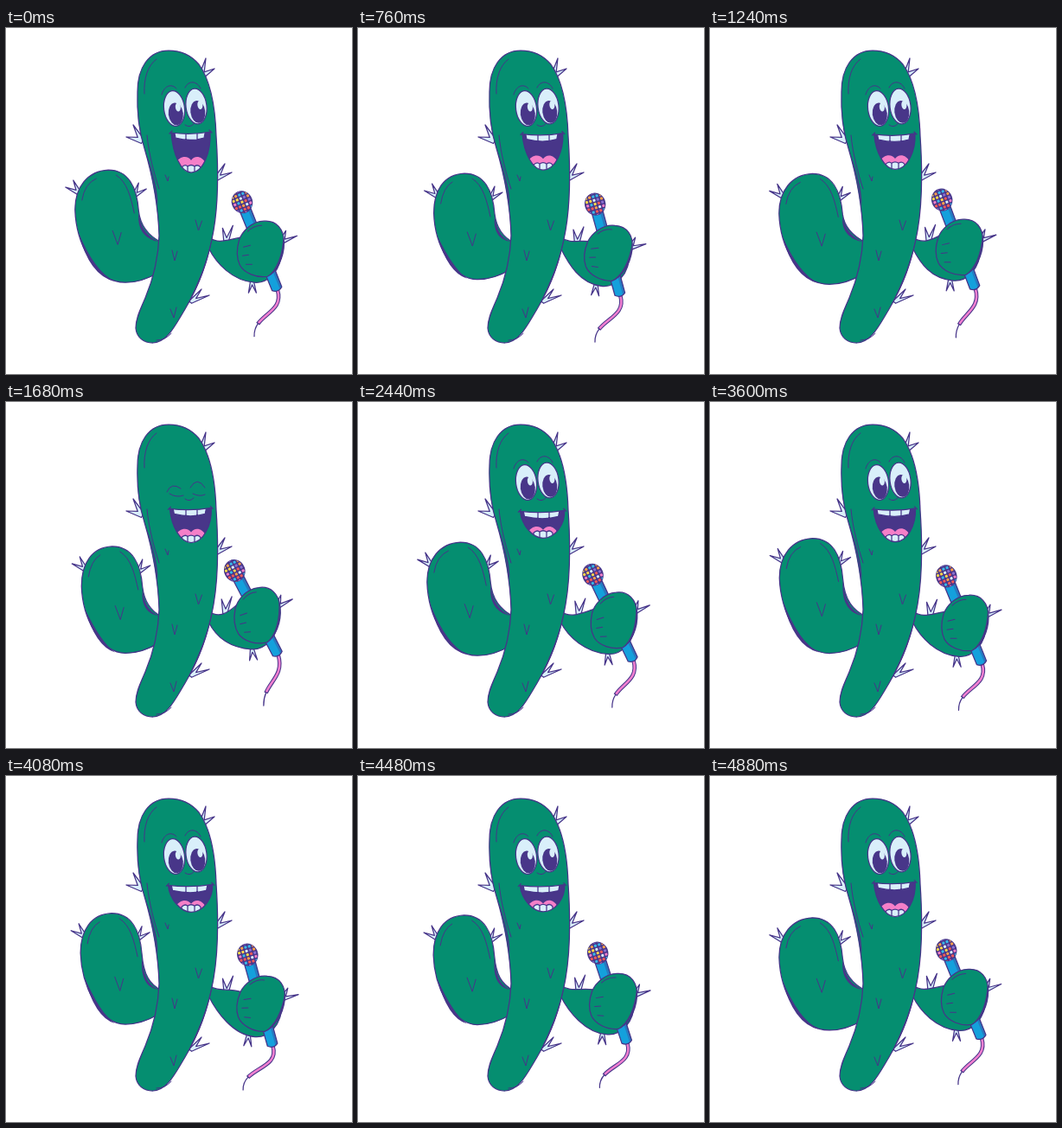
An HTML page for the animation above (4.92 s loop, 400x400 px).

```html
<!DOCTYPE html>
<html lang="en">
<head>
<meta charset="utf-8">
<title>Singing cactus</title>
<style>
html, body { margin: 0; width: 100%; height: 100%; overflow: hidden; background: #fff; }
svg { display: block; width: 100%; height: 100%; }
.ink { stroke: #463489; stroke-width: 1.25; stroke-linejoin: round; stroke-linecap: round; }
.skin { fill: #058e70; }
.pale { fill: #d9effa; }
.dark { fill: #483689; }
.line { fill: none; stroke-width: 1; }
</style>
</head>
<body>
<svg viewBox="0 0 400 400">
  <defs>
    <clipPath id="mouthClip"><path id="mouthCut"/></clipPath>
    <clipPath id="headClip"><ellipse cy="-55" rx="11.5" ry="12.5"/></clipPath>
    <clipPath id="eyeClip"><ellipse rx="12" ry="20.5"/></clipPath>
    <g id="eye">
      <ellipse class="ink pale" rx="12" ry="20.5"/>
      <g clip-path="url(#eyeClip)">
        <ellipse class="dark" cx="1" cy="6.500" rx="8.500" ry="13"/>
        <ellipse class="pale" cx="4.500" cy="-1" rx="3" ry="5"/>
      </g>
    </g>
  </defs>

  <path id="armSpikes" class="ink pale"/>
  <path id="arm" class="ink skin"/>
  <path id="armShade" class="dark"/>
  <path id="armLines" class="ink line"/>

  <path id="foreSpikes" class="ink pale"/>
  <path id="forearm" class="ink skin"/>

  <path id="bodySpikes" class="ink pale"/>
  <path class="ink skin" d="M188 26C165 26 152 46 152 74C151 102 154 120 160 139C168 166 176 205 177 240C176 268 169 293 161 312C156 324 150 335 150 347C151 358 159 364 170 364C187 363 196 343 207 325C222 300 234 268 240 234C245 205 246 170 243 125C242 91 236 60 223 42C213 30 202 26 188 26Z"/>
  <path class="dark" d="M162 145C167 160 172 178 175 207C177 196 171 166 162 145ZM241 226C238 254 225 290 208 323C225 297 237 262 241 226Z"/>
  <path class="ink line" d="M160 76C159 58 164 43 174 36M163 124C165 145 171 168 177 186M184 170l3 7l1-5M219 222l3.500 12l4-11M192 257l3 12l3-11M190 325l4 10l3-12M191 353Q184 361 174 361"/>

  <g id="open">
    <use href="#eye" transform="translate(194.500 93) rotate(-7)"/>
    <use href="#eye" transform="translate(220 90.500) rotate(-7)"/>
    <path class="ink line" d="M180 77C183 66 192 64 197 70M207 69C211 60 221 61 225 70"/>
  </g>
  <path id="shut" class="ink line" d="M186 104Q191 92 202 100M213 99Q221 85 230 99M189 106Q197 111 205 108M216 106Q224 110 230 107"/>
  <path class="ink line" d="M207 112Q212 116 217 111"/>

  <path id="mouth" class="dark"/>
  <g clip-path="url(#mouthClip)">
    <path id="tongue" fill="#f57fc8"/>
    <path id="teeth" class="ink pale"/>
  </g>
  <path id="lips" class="ink" fill="none"/>

  <path id="cordInk" class="ink" fill="none"/>
  <path id="cordWide" fill="none" stroke="#463489" stroke-width="4.600" pathLength="100" stroke-dasharray="76 100"/>
  <path id="cordPink" fill="none" stroke="#f07fd0" stroke-width="2.600" pathLength="100" stroke-dasharray="74 100"/>

  <g id="mic">
    <path class="ink" fill="#14a0dc" d="M-6.500 -44H6.500L6 53Q0 58 -6 53Z"/>
    <path class="dark" d="M3 -43H6.500L6 53L3 55Z" opacity=".35"/>
    <ellipse class="ink dark" cy="-55" rx="11.500" ry="12.500"/>
    <g id="beads" clip-path="url(#headClip)"></g>
  </g>
  <g id="fist">
    <path class="ink skin" d="M-24 -7C-21 -16 -10 -29 5 -29C19 -30 28 -20 28 -4C28 14 19 30 9 35C-4 37 -18 31 -23 22C-28 12 -26 0 -24 -7Z"/>
    <path class="dark" d="M27 -12C30 8 22 28 8 35.500C20 27 26 10 27 -12Z"/>
    <path class="ink line" d="M-19 1l8-2M-20 11l7-1M-16 21l7 0M-14 -17Q-7 -24 2 -24"/>
  </g>
</svg>

<script>
const LOOP = 4920, STEP = 40;
const el = id => document.getElementById(id);
const put = (id, d) => el(id).setAttribute("d", d);

// Cosine that repeats n times per loop; shift is in loops
const wave = (t, n, shift = 0) => Math.cos(2 * Math.PI * n * (t / LOOP - shift));

// Forked thorn: base, then its two tips
function spike(x, y, x1, y1, x2, y2) {
  const wx = (x1 - x2) * .18, wy = (y1 - y2) * .18;
  const nx = x * .62 + (x1 + x2) * .19, ny = y * .62 + (y1 + y2) * .19;
  return `M${x + wx} ${y + wy}L${x1} ${y1}L${nx} ${ny}L${x2} ${y2}L${x - wx} ${y - wy}Z`;
}

// Four swings per loop on top of one slow stretch
function drawArm(t) {
  const swing = -4.5 * wave(t, 4);
  const l = 84.3 + swing, x = 121 + swing * .6;
  const y = 163 + 5.5 * wave(t, 1, .22), b = 290.5 - swing * .7 + (y - 163) * .5;
  put("arm", `M180 248C166 241 ${x + 37} 230 ${x + 35} ${y + 47}C${x + 33} ${y + 20} ${x + 23} ${y} ${x} ${y}` +
    `C${x - 24} ${y + 1} ${l} ${y + 20} ${l} ${y + 46}C${l + 1} ${y + 82} ${l + 22} ${b} 138 ${b}C155 ${b} 167 ${b - 6} 177 ${b - 12}`);
  put("armShade", `M${l + 4} ${y + 72}Q${l + 16} ${b - 8} 126 ${b - 1}Q${l + 22} ${b - 13} ${l + 4} ${y + 72}Z` +
    `M${x + 35} ${y + 50}C${x + 37} 230 163 241 176 247C164 245 ${x + 33} 236 ${x + 35} ${y + 50}Z`);
  const vx = 131 + swing * .4, vy = 250 + (y - 163) * .4;
  put("armLines", `M${vx - 6} ${vy - 16}L${vx} ${vy}L${vx + 4} ${vy - 14}` +
    `M${x + 9} ${y + 6}C${x + 22} ${y + 14} ${x + 26} ${y + 32} ${x + 30} ${y + 50}` +
    `M${l + 8} ${y + 35}Q${l + 11} ${y + 16} ${x - 14} ${y + 10}`);
  put("armSpikes", spike(l + 6, y + 28, l - 11, y + 20, l - 2, y + 12) +
    spike(x + 29, y + 31, x + 35, y + 15, x + 44, y + 22));
}

// The grip sways; tilting the microphone up lifts the hand and swings the cord
function drawMic(t) {
  const tilt = 22 - 5 * wave(t, 1) + 1.6 * wave(t, 2) + 3.3 * wave(t, 3);
  const x = 292.5 + 3.3 * wave(t, 1, .71) + 1.8 * wave(t, 2);
  const lift = tilt - 22.4, y = 249 - 1.1 * lift + .6 * (x - 289);
  const ex = 288 + 2 * lift, ey = 356 - lift;
  const r = tilt * Math.PI / 180, turn = (tilt - 22) * Math.PI / 180;
  const c = Math.cos(turn), s = Math.sin(turn);
  const thorn = (...p) => {
    const q = [];
    for (let i = 0; i < 6; i += 2) q.push(x + p[i] * c + p[i + 1] * s, y - p[i] * s + p[i + 1] * c);
    return spike(...q);
  };
  el("mic").setAttribute("transform", `translate(${x} ${y}) rotate(${-tilt})`);
  el("fist").setAttribute("transform", `translate(${x} ${y}) rotate(${22 - tilt})`);
  put("forearm", `M234 242C246 250 255 245 ${x - 22} ${y - 10}L${x + 25} ${y + 2}` +
    `C${x + 26} ${y + 30} ${x + 8} ${y + 43} ${x - 6} ${y + 42}C${x - 32} ${y + 40} 243 272 234 254Z`);
  const fx = (x - 289) * .3, fy = (y - 249) * .4;
  put("foreSpikes", spike(253 + fx, 249 + fy, 249 + fx, 230 + fy, 261 + fx, 227 + fy) +
    thorn(24, -4, 30, -18, 43, -12) + thorn(-9, 39, -4, 54, -13, 54));
  const px = x + 55 * Math.sin(r), py = y + 55 * Math.cos(r);
  const cord = `M${px} ${py}C${px + 8} ${py + 27} ${ex - 1} ${ey - 26} ${ex} ${ey}`;
  ["cordInk", "cordWide", "cordPink"].forEach(id => put(id, cord));
}

// An open jaw is taller and narrower
function drawMouth(t) {
  const jaw = .5 + .5 * wave(t, 27);
  const l = 187 + 4 * jaw, r = 239 - 3 * jaw, m = 214;
  const y = 126 - 6 * jaw, b = 156 + 11 * jaw, h = b - y;
  const d = `M${l} ${y + 1}Q${m} ${y + 4} ${r} ${y}C${r + 1} ${y + h * .5} ${m + 14} ${b} ${m} ${b}` +
    `C${m - 12} ${b} ${l + 2} ${y + h * .55} ${l} ${y + 1}Z`;
  put("mouth", d);
  put("mouthCut", d);
  put("lips", d + `M${l - 2} ${y + 2}l3 -3M${r - 1} ${y - 2}l3 3`);
  const g = b - h * .3, low = b - 8;
  put("tongue", `M${m - 18} ${b}V${g + 4}C${m - 14} ${g - 5} ${m - 4} ${g - 6} ${m} ${g}` +
    `C${m + 4} ${g - 6} ${m + 13} ${g - 5} ${m + 17} ${g + 4}V${b}Z`);
  put("teeth", `M${l + 3} ${y - 3}L${l + 5} ${y + 7}Q${m} ${y + 12} ${r - 7} ${y + 7}L${r - 5} ${y - 3}Z` +
    `M${m - 6} ${y}v9M${m + 7} ${y}v9` +
    `M${m - 11} ${b + 2}V${low + 2}Q${m - 7} ${low - 2} ${m - 4} ${low + 1}Q${m} ${low - 2} ${m + 4} ${low + 1}` +
    `Q${m + 8} ${low - 2} ${m + 11} ${low + 2}V${b + 2}ZM${m - 4} ${low + 1}V${b}M${m + 4} ${low + 1}V${b}`);
}

function addBeads() {
  const hues = ["#ffd84a", "#f57fc8", "#d9effa", "#f05a5a", "#38b8e8", "#ffa04a", "#8a6fd0"];
  let out = "";
  for (let j = -3; j <= 3; j++) for (let i = -3; i <= 3; i++) {
    const hue = hues[(i * 3 + j * 5 + i * i * j * j + 70) % 7];
    out += `<rect x="${i * 4.4 - 1.5}" y="${j * 4.4 - 56.5}" width="3" height="3" rx=".8" fill="${hue}"/>`;
  }
  el("beads").innerHTML = out;
}

function render(ms) {
  const t = Math.floor(ms % LOOP / STEP) * STEP;
  const shut = t >= 1600 && t < 1800;
  drawArm(t);
  drawMic(t);
  drawMouth(t);
  el("open").style.display = shut ? "none" : "";
  el("shut").style.display = shut ? "" : "none";
}

put("bodySpikes", spike(225, 57, 231, 35, 241, 47) + spike(158, 131, 139, 126, 147, 112) +
  spike(242, 175, 253, 157, 261, 167) + spike(213, 317, 226, 302, 235, 309));
addBeads();
render(0);
const start = performance.now();
(function tick() {
  render(performance.now() - start);
  requestAnimationFrame(tick);
})();
</script>
</body>
</html>
```
